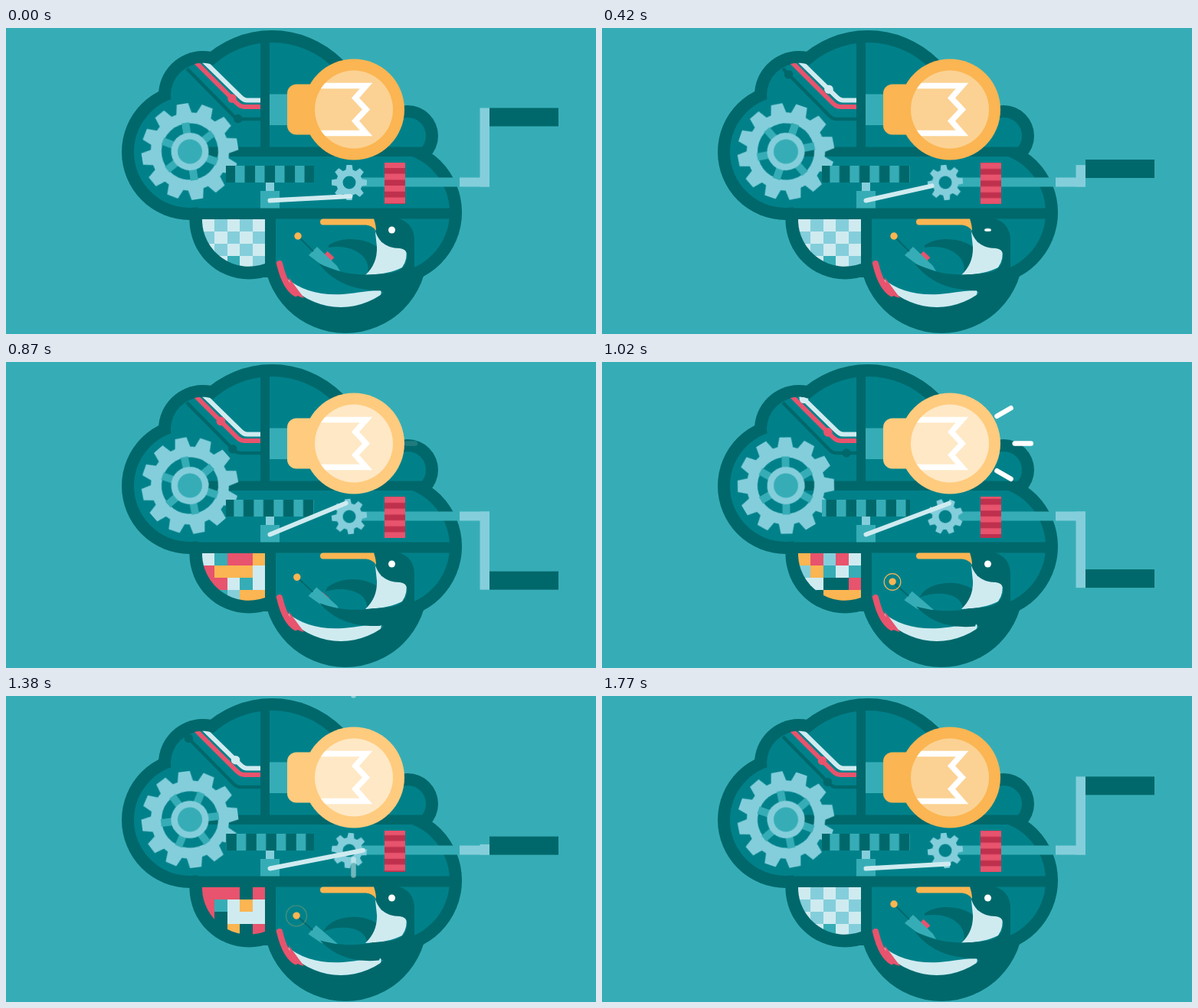
These frames come from a looping animation (770 px wide and 400 px high, 1.8 s). An HTML page:

```html
<!DOCTYPE html>
<html lang="en">
<head>
<meta charset="utf-8">
<title>Brain machine</title>
<style>
  :root {
    --bg: #36adb6; --dark: #00686b; --mid: #00818a; --light: #84cedb;
    --pale: #cfebf0; --orange: #fbb552; --pink: #e8536d; --wine: #bf304d;
  }
  html, body { margin: 0; width: 100%; height: 100%; overflow: hidden; background: var(--bg); }
  svg { display: block; width: 770px; height: 400px; }
  .bg { fill: var(--bg); } .dark { fill: var(--dark); } .mid { fill: var(--mid); }
  .light { fill: var(--light); } .pale { fill: var(--pale); }
  .orange { fill: var(--orange); } .pink { fill: var(--pink); }
  .line { fill: none; }
  .loop { animation: 1800ms linear infinite; }
  #gear { animation-name: gear; }
  #pinion { animation-name: pinion; }
  #rack { animation-name: rack; }
  #drum { animation-name: drum; }
  #eye { animation-name: blink; transform-origin: 503.5px 264px; }
  .glass { animation-name: glass; }
  .glow { animation-name: glow; }
  @keyframes gear {
    from { transform: translate(240px, 161.5px) rotate(-9deg); }
    to { transform: translate(240px, 161.5px) rotate(111deg); }
  }
  @keyframes pinion {
    from { transform: translate(448px, 202px) rotate(0deg); }
    to { transform: translate(448px, 202px) rotate(360deg); }
  }
  @keyframes rack { to { transform: translateX(104px); } }
  @keyframes drum { to { transform: translateY(-61.6px); } }
  @keyframes blink { 0%, 19% { transform: none; } 22%, 23% { transform: scaleY(.4); } 27%, 100% { transform: none; } }
  @keyframes glass { 0%, 44.4% { fill: #fbb552; } 45.5%, 91.5% { fill: #ffcb7e; } 93%, 100% { fill: #fbb552; } }
  @keyframes glow { 0%, 44.4% { fill: #fbd293; } 45.5%, 91.5% { fill: #ffe8c5; } 93%, 100% { fill: #fbd293; } }
</style>
</head>
<body>
<svg viewBox="0 0 770 400">
  <defs>
    <clipPath id="topLeft"><path d="M214 88A42 42 0 0 1 269 47.800A114 114 0 0 1 332 20V155H214Z"/></clipPath>
    <clipPath id="pocket"><path d="M256 249.500H338V308A61 61 0 0 1 256 251Z"/></clipPath>
    <clipPath id="rackBox"><path d="M287 180H402V202H287Z"/></clipPath>
    <clipPath id="drumBox"><path d="M494 176H521V230H494Z"/></clipPath>
    <clipPath id="belly"><circle cx="437" cy="274" r="91"/></clipPath>
    <clipPath id="lamp"><circle cx="454" cy="106.500" r="51"/></clipPath>
  </defs>

  <!-- shell -->
  <g class="dark">
    <circle cx="240" cy="162" r="89"/><circle cx="257" cy="88" r="58"/>
    <circle cx="347" cy="133" r="130"/><circle cx="524" cy="141" r="40"/>
    <circle cx="500" cy="241" r="95"/><circle cx="317" cy="251" r="77.500"/>
    <circle cx="443" cy="292" r="107"/><path d="M240 110H520V251H240Z"/>
  </g>
  <g class="mid">
    <circle cx="240" cy="162" r="73"/><circle cx="257" cy="88" r="42"/>
    <circle cx="347" cy="133" r="114"/><circle cx="524" cy="141" r="24"/>
    <circle cx="500" cy="241" r="79"/><circle cx="437" cy="274" r="91"/>
    <path d="M250 110H510V240H250Z"/>
  </g>
  <path class="dark" d="M332 18H344V160H332ZM260 155.500H552V168H260ZM240 235.500H584V249.500H240ZM338 245H352V326H338Z"/>
  <path class="dark" d="M240 249.500H352V312L345 326H317A77 77 0 0 1 240 249.500Z"/>
  <g id="cells" clip-path="url(#pocket)" shape-rendering="crispEdges"></g>

  <!-- wires -->
  <g clip-path="url(#topLeft)">
    <path id="wireDark" class="line" stroke="var(--dark)" stroke-width="4.500" d="M236 53L297 115Q301 119 306 119H334"/>
    <path id="wirePink" class="line" stroke="var(--pink)" stroke-width="6" d="M248 45L301 98Q306 103 311 103H334"/>
    <path id="wirePale" class="line" stroke="var(--pale)" stroke-width="6" d="M258 43L306 90Q310 94.500 315 94.500H334"/>
    <g id="dots"></g>
  </g>

  <!-- crank -->
  <path class="bg" d="M462 195.500H594V207.500H462Z"/>
  <path class="light" d="M592 195.500H631V207.500H592Z"/>
  <rect id="arm" class="light" x="618.500" width="12.500"/>
  <rect id="handle" class="dark" x="631" width="90" height="24"/>

  <!-- gears -->
  <g id="gear" class="loop"></g>
  <g clip-path="url(#rackBox)">
    <path class="dark" d="M287 180H402V202H287Z"/>
    <path id="rack" class="line loop" stroke="var(--bg)" stroke-width="22" stroke-dasharray="12.500 13.500" d="M169 191H410"/>
  </g>
  <path class="light" d="M339 202H350V214H339Z"/>
  <path class="bg" d="M332 213H357V235.500H332Z"/>
  <g id="pinion" class="loop"></g>
  <line id="rod" x1="344.500" y1="225.500" stroke="var(--pale)" stroke-width="6" stroke-linecap="round"/>
  <g clip-path="url(#drumBox)">
    <path class="pink" d="M494 176H521V230H494Z"/>
    <path id="drum" class="line loop" stroke="var(--wine)" stroke-width="27" stroke-dasharray="7.600 7.800" d="M507.500 106V300"/>
  </g>

  <!-- bulb -->
  <path class="bg" d="M344 86.500H370V127H344Z"/>
  <rect class="glass loop" x="367" y="73.500" width="50" height="66" rx="12"/>
  <circle class="glass loop" cx="454" cy="106.500" r="66"/>
  <circle class="glow loop" cx="454" cy="106.500" r="51"/>
  <path class="line" clip-path="url(#lamp)" stroke="#fff" stroke-width="7.500" d="M400 75.500H470L456 91.500L470 106.500L456 121.500L470 137.500H400"/>

  <!-- bird -->
  <g clip-path="url(#belly)">
    <path class="pale" d="M366 327C385 343 410 350 440 348C460 346 475 343 490 343L486 372H380Z"/>
  </g>
  <path class="line" stroke="var(--pink)" stroke-width="8" stroke-linecap="round" d="M357 308C361 325 368 341 378 347"/>
  <path class="pink" d="M369 326L389 353Q380 351 373 345Z"/>
  <path id="wing" class="dark"/>
  <path class="pale" d="M481 258L490 280L522 287Q525 302 517 313Q500 322 469 323Q485 308 484 286Z"/>
  <path class="dark" d="M481 249H512Q533 255 533 278V330L515 350L490 345L478 322.500C498 320 513 322 521 309Q524 303 523.500 297Q523 289 514 288C494 288 484 276 481 262Z"/>
  <path class="orange" d="M414 249.500H480Q483 258 483 265Q478 258 470 257.500H414A4 4 0 0 1 414 249.500Z"/>
  <circle id="eye" class="loop" fill="#fff" cx="503.500" cy="264" r="4.500"/>
  <g id="remote">
    <rect id="button" class="pink" x="-6" y="-3.500" width="12" height="7"/>
    <path class="bg" d="M395 297L406 286L432 311L436 318Q418 312 411 309Z"/>
    <path class="line" stroke="var(--dark)" stroke-width="2" d="M381 272L401 292"/>
    <circle class="orange" cx="381" cy="272" r="4.700"/>
  </g>
  <path id="flipper" class="dark"/>
  <circle id="ring" class="line" cx="379" cy="287.500" stroke="var(--orange)" stroke-width="1.200"/>
  <g id="rays" stroke="#fff" stroke-width="6.500" stroke-linecap="round"></g>
</svg>

<script>
const LOOP = 1800;
const $ = id => document.getElementById(id);
const clamp = x => Math.max(0, Math.min(1, x));
const ramp = (t, a, b) => clamp((t - a) / (b - a));
const mix = (a, b, k) => a + (b - a) * k;

function set(el, attrs) {
  for (const key in attrs) el.setAttribute(key, attrs[key]);
  return el;
}
function add(parent, tag, attrs) {
  const el = document.createElementNS('http://www.w3.org/2000/svg', tag);
  return parent.appendChild(set(el, attrs));
}

// A toothed ring with an open hole.
function cog(parent, { teeth, hole, root, tip, halfRoot, halfTip }) {
  add(parent, 'circle', {
    r: (hole + root) / 2, class: 'line', stroke: 'var(--light)', 'stroke-width': root - hole
  });
  for (let i = 0; i < teeth; i++) {
    add(parent, 'path', {
      class: 'light',
      d: `M${-halfRoot} ${3 - root}L${-halfTip} ${-tip}H${halfTip}L${halfRoot} ${3 - root}Z`,
      transform: `rotate(${i * 360 / teeth})`
    });
  }
}
cog($('gear'), { teeth: 12, hole: 37, root: 51, tip: 63, halfRoot: 10.5, halfTip: 7.5 });
for (let a = 0; a < 360; a += 60) {
  add($('gear'), 'rect', { x: -5, y: -38, width: 10, height: 20, class: 'bg', transform: `rotate(${a})` });
}
add($('gear'), 'circle', { r: 24.5, class: 'light' });
add($('gear'), 'circle', { r: 16, class: 'bg' });
cog($('pinion'), { teeth: 8, hole: 8.5, root: 17, tip: 23, halfRoot: 5, halfTip: 3.6 });

// Each wire carries two passes of a dot: [start, duration].
const wires = [
  ['wireDark', 'dark', [[335, 755], [1350, 600]]],
  ['wirePink', 'pink', [[515, 800], [1490, 510]]],
  ['wirePale', 'pale', [[20, 690], [945, 700]]]
].flatMap(([id, cls, passes]) => passes.map(([start, span]) => ({
  path: $(id), size: $(id).getTotalLength(), start, span,
  dot: add($('dots'), 'circle', { r: 5.8, class: cls })
})));

const cells = Array.from({ length: 20 }, (_, i) => add($('cells'), 'rect', {
  x: 256 + i % 5 * 16.4, y: 249.5 + Math.floor(i / 5) * 16.3, width: 16.6, height: 16.5
}));
const bright = ['pink', 'orange', 'pale', 'dark', 'bg', 'pale', 'orange', 'pink', 'light'];
const noise = n => {
  const x = Math.sin(n * 12.9898 + 4.1) * 43758.5453;
  return x - Math.floor(x);
};

const rays = [-90, -60, -30, 0, 30, 60, 90].map(a => ({
  delay: 795 + Math.abs(a) / 30 * 80,
  el: add($('rays'), 'line', { y1: 0, y2: 0, transform: `translate(453.5 106.500) rotate(${a})` })
}));

function drawCrank(t) {
  const x = t % 900 / 900, p = 1.87;
  const ease = x ** p / (x ** p + (1 - x) ** p);
  const y = (t < 900 ? 1 : -1) * mix(-85, 85, ease);
  const end = 201.5 + y + 12 * Math.sin(Math.max(-1, Math.min(1, y / 65)) * Math.PI / 2);
  const top = Math.min(195.5, end), bottom = Math.max(207.5, end);
  set($('arm'), { y: top, height: bottom - top });
  set($('handle'), { y: 189.5 + y });

  const a = (86 + t / 5) * Math.PI / 180;
  set($('rod'), { x2: 448 + 18 * Math.cos(a), y2: 202 + 18 * Math.sin(a) });
}

function drawWires(t) {
  for (const w of wires) {
    const k = (t - w.start + LOOP) % LOOP / w.span;
    const pt = w.path.getPointAtLength(Math.min(1, k) * w.size);
    set(w.dot, { cx: pt.x, cy: pt.y, opacity: k < 1 ? 1 : 0 });
  }
}

function drawCells(t) {
  const on = t >= 800 && t < 1660, step = Math.floor(t / 90);
  cells.forEach((cell, i) => {
    const col = i % 5, row = Math.floor(i / 5);
    const calm = (col + row) % 2 ? (noise(i) < .3 ? 'bg' : 'light') : 'pale';
    set(cell, { class: on ? bright[Math.floor(noise(i + step * 31) * bright.length)] : calm });
  });
}

function drawRays(t) {
  for (const { el, delay } of rays) {
    const age = t - delay, outer = 71 + age * .172;
    set(el, {
      x1: Math.max(69, outer - 21), x2: Math.max(69, outer),
      opacity: ramp(age, 45, 125) * (1 - ramp(age, 230, 410))
    });
  }
}

// Closed curves in two poses: a start point, then cubic segments.
const poses = {
  wing: [
    [421, 284, 438, 272, 468, 274, 484, 286, 485, 300, 480, 312, 471, 323, 480, 300, 452, 281, 421, 287],
    [418, 302, 430, 288, 462, 283, 484, 297, 484, 308, 479, 318, 471, 323, 470, 302, 438, 298, 414, 308]
  ],
  flipper: [
    [408, 307.5, 428, 318, 450, 324, 480, 322, 490, 328, 494, 336, 492, 343.5, 462, 343, 430, 337, 408, 307.5],
    [410, 319.5, 430, 325, 452, 328, 480, 322, 490, 328, 490, 338, 487, 345.5, 462, 348, 432, 344, 410, 319.5]
  ]
};

function drawBird(t) {
  const k = ramp(t, 770, 900) * (1 - ramp(t, 1500, 1690));
  for (const id in poses) {
    const [up, down] = poses[id];
    const [x, y, ...rest] = up.map((v, i) => mix(v, down[i], k));
    set($(id), { d: `M${x} ${y}C${rest}Z` });
  }
  set($('remote'), { transform: `translate(${-k / 2} ${13 * k}) rotate(${-3 * k} 420 300)` });
  set($('button'), { transform: `translate(${421.5 - 10 * k} ${298.5 + k}) rotate(43)` });
  set($('ring'), {
    r: mix(5, 13.5, ramp(t, 890, 1050)),
    opacity: ramp(t, 890, 940) * (1 - ramp(t, 1080, 1500))
  });
}

const clock = $('gear').getAnimations()[0];
function frame() {
  const t = (clock.currentTime || 0) % LOOP;
  for (const draw of [drawCrank, drawWires, drawCells, drawRays, drawBird]) draw(t);
  requestAnimationFrame(frame);
}
frame();
</script>
</body>
</html>
```
